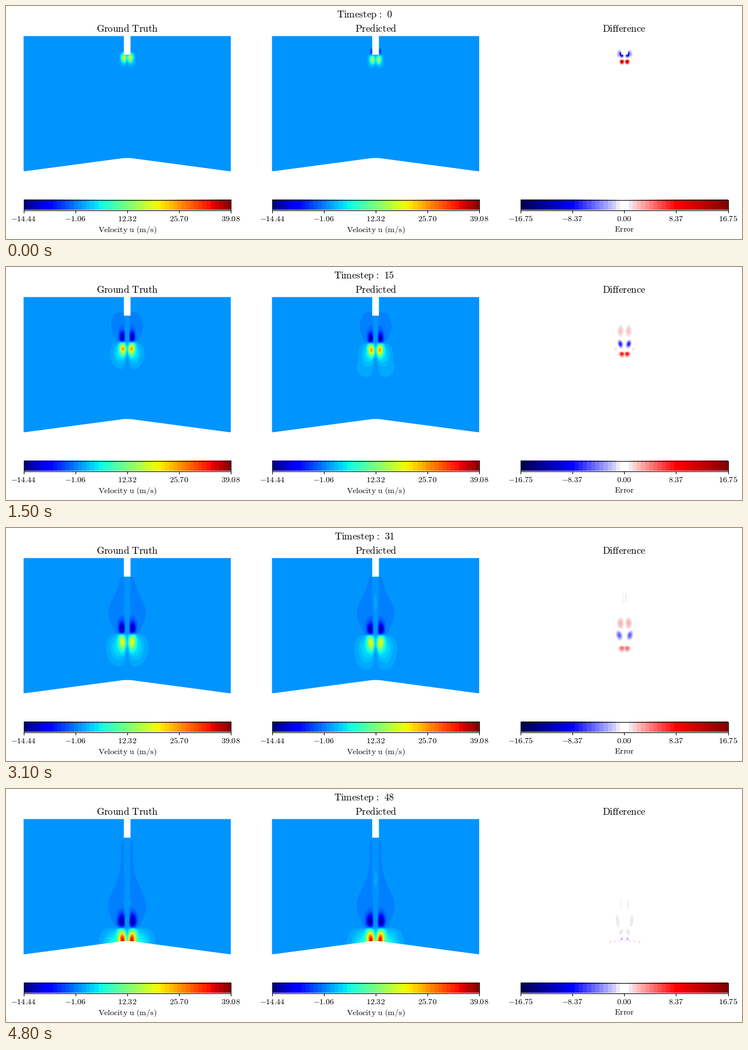
Write a matplotlib script that moves like this. It is 1280 by 407 pixels and loops after 4.9 s.

```python
import numpy as np
import matplotlib.pyplot as plt
from matplotlib.animation import FuncAnimation
from matplotlib.patches import Rectangle

plt.rcParams["mathtext.fontset"] = "cm"

W, H, DPI = 1280, 407, 100
FRAMES, INTERVAL = 49, 100
BANDS = 50
V_RANGE = (-14.44, 39.08)
E_RANGE = (-16.75, 16.75)
LEFT, PITCH, PW = 30.6, 432.3, 360.3
TOP, PH = 52, 238
BAR_TOP, BAR_H = 338.5, 18
LEVEL = 0.535

# Distance from the symmetry axis and height on the stage, per pixel
COLS = 362
d, y = np.meshgrid(np.abs(np.arange(COLS) + 0.5 - 0.6 - PW / 2),
                   TOP + np.arange(PH) + 0.5)
floor = np.clip(265.6 + 22.5 * (d - 6) / 168, 265.6, 288.5)


def within(gap):
    """Pixel coverage for a signed distance to an edge."""
    return np.clip(gap + 0.5, 0, 1)


cover = within(PW / 2 - d) * within(y - 52.5) * within(floor - y)
cover = (cover * (1 - within(5.8 - d) * within(85 - y)))[..., None]


def blob(x0, y0, sx, up, down=None, slant=0.0):
    """Gaussian pair mirrored about the axis, with its own reach up and down."""
    dy = y - y0
    sy = np.where(dy < 0, up, up if down is None else down)
    dx = d - x0 + slant * dy
    return np.exp(-0.5 * ((dx / sx) ** 2 + (dy / sy) ** 2))


def streak(x0, y0, length, width):
    """Slightly bent Gaussian lying along the outgoing wave front."""
    ux, uy = -0.47, 0.883
    a = (d - x0) * ux + (y - y0) * uy
    b = (d - x0) * uy - (y - y0) * ux + 0.006 * a * a
    return np.exp(-0.5 * ((a / length) ** 2 + (b / width) ** 2))


def step(v, width):
    return 1 / (1 + np.exp(-np.clip(v / width, -50, 50)))


def grow(t, tau):
    return 1 - np.exp(-t / tau)


def impact(t):
    """Rises from 0 to 1 as the jet reaches the floor."""
    return step(t - 46, 0.8)


def wave(t):
    return 1.5 * grow(t, 1) * np.exp(-t / 18) * step(12.5 - t, 0.4)


def jet_y(t):
    return 90.5 + 3.48 * t + 7 * impact(t)


def jet_flow(t, yp, front):
    hit = impact(t)
    amp = 17 + 10 * np.exp(-((t - 10) / 7) ** 2) + 15 * hit
    pos = amp * blob(5 + 3.7 * grow(t, 18) - hit, yp,
                     3.4 + 0.03 * t, 5 + 0.14 * t, slant=0.1)

    halo = 2 + 2.5 * grow(t, 4) + 2 * hit
    half = 14 + 14 * grow(t, 3) + 0.0095 * t * t
    drop = 9 + 11 * grow(t, 3) + 0.5 * t
    x0, y0 = 0.38 * half, yp + 8
    r = np.sqrt(2 * np.log(halo / LEVEL))
    pos += halo * blob(x0, y0, (half - x0) / r, 0.6 * (y0 - front), drop / r)
    return pos * (1 - np.exp(-(d / 4) ** 2) * (0.3 + 0.6 * step(y - yp - 9, 3)))


def wake_flow(t, front):
    core = 12 * grow(t, 3) * blob(6.3 + 3.3 * grow(t, 18), front - 6.5 - 0.1 * t,
                                  2.8 + 0.03 * t, 6 + 0.06 * t, 6)
    # Veil that swells above the front and tapers up to the nozzle
    s = front - y
    swell = 38 * grow(t, 11) + 1
    half = 10 + (33 * grow(t, 8) - 10) * np.exp(-((s - swell) / (swell + 2)) ** 2)
    amp = 0.72 + 1.5 * np.exp(-((s - 15) / 25) ** 2)
    veil = amp * np.exp(-(d / np.maximum(half, 4)) ** 2 * np.log(amp / LEVEL))
    veil *= grow(t, 3) * step(y - 73 - 0.3 * t, 1.5)
    return (core + veil) * (1 - np.exp(-(d / 4.8) ** 4))


def flow(t, shift=0.0):
    front = 80 + 3.4 * t + shift
    s = step(y - front, 1.2)
    return s * jet_flow(t, jet_y(t) + shift, front) - (1 - s) * wake_flow(t, front)


def truth(t):
    u = flow(t) + wave(t) * streak(20 + 1.67 * t, 102 + 5 * t,
                                   6 + 1.45 * t, 2 + 0.28 * t)
    return u + 0.9 * step(t - 28, 1) * blob(4, 42 + 3.3 * t, 1.8, 5)


def predicted(t):
    u = flow(t, (1.5 + 1.7 * np.exp(-t / 10)) * (1 - impact(t)))
    u *= 1 - 0.18 * np.exp(-t / 2)

    # Crescent running outward and down
    size, yc = 0.35 + 0.072 * t, 88 + 1.33 * t
    rho = np.hypot((d - 12) / (32 * size), (y - yc) / (63 * size))
    ring = np.exp(-0.5 * ((rho - 0.96) / 0.11) ** 2)
    u += wave(t) * ring * step(y - yc, 2) * step(d - 2 - 0.35 * (y - yc - 45 * size), 1.5)

    # Feet that follow the lobes
    foot = 0.95 * step(t - 11, 1) * np.clip((40 - t) / 20, 0, 1)
    u += foot * blob(21, jet_y(t) + 38, 10, 10, slant=0.35)

    u -= 5 * np.exp(-t) * blob(7, 80, 2, 4)
    return u + 0.85 * step(t - 20, 1) * blob(0, 85 + 1.5 * t, 2.5, 15)


def error(t):
    hit = impact(t)
    thin = 1 - np.exp(-(d / 1.2) ** 2)
    e = -11.5 * np.exp(-t / 42) * (1 - hit) * blob(
        5.5 + 0.12 * t, 85 + 3.3 * t, 2.1 + 0.03 * t, 3 + 0.06 * t, slant=0.15)
    e += 15 * np.exp(-t / 29) * (1 - hit) * blob(
        4.6, 97 + 3.62 * t, 2.1 + 0.04 * t, 2, 2.6 + 0.05 * t)
    e += 2.9 * grow(t, 10) * (1 - 0.6 * hit) * thin * blob(
        7 + 5.5 * hit, 60.5 + 3.42 * t + 8 * hit, 3.6 - hit, 6.5 + 4 * hit, slant=0.1 * hit)

    # Faint traces: nozzle wings, outgoing wave, side lobes, rising threads
    e -= 2.4 * np.exp(-t) * blob(10.5, 83, 2.2, 4.5, slant=-0.2)
    e += 1.15 * wave(t) * streak(17 + 1.25 * t, 100 + 5 * t, 6 + 1.3 * t, 2 + 0.22 * t)
    e += 1.05 * np.exp(-((t - 12) / 5) ** 2) * blob(15, jet_y(t) + 1, 4, 9)
    e += 1.1 * step(t - 20, 0.5) * blob(2.2 + 4.3 * hit, 20 + 3.3 * t + 25 * hit, 0.9, 9)

    # Contact with the floor
    skin = np.exp(-((y - floor + 1) / 1.2) ** 2) * (d < 28)
    e += hit * (2 * skin * (0.6 + 0.4 * np.cos(d * 0.75)) + blob(6, 250, 3.2, 6, slant=-0.3))
    return e - 2.5 * hit * blob(5, 262, 2, 2.5)


def band_colors(name):
    return plt.get_cmap(name)((np.arange(BANDS) + 0.5) / BANDS)[:, :3]


jet = band_colors("jet")
seismic = band_colors("seismic")
seismic[24:26] = 1
seismic[[23, 26]] = np.array([240, 232, 240]) / 255


def paint(values, limits, lut):
    lo, hi = limits
    idx = np.clip((values - lo) / (hi - lo) * BANDS, 0, BANDS - 1).astype(int)
    return 1 - cover * (1 - lut[idx])


fig = plt.figure(figsize=(W / DPI, H / DPI), dpi=DPI, facecolor="white")
ax = fig.add_axes([0, 0, 1, 1])
ax.axis("off")


def roman(s):
    return r"$\mathrm{" + s.replace(" ", r"\ ") + "}$"


def label(x, base, s, size):
    return ax.text(x, base, roman(s), size=size, ha="center", va="baseline")


def picture(data, x, top, width, height):
    return ax.imshow(data, extent=(x, x + width, top + height, top),
                     interpolation="nearest", aspect="auto")


def colorbar(x, lut, limit, name):
    picture(lut[None], x, BAR_TOP, PW, BAR_H)
    ax.add_patch(Rectangle((x, BAR_TOP), PW, BAR_H, fill=False, ec="black", lw=0.8))
    end = BAR_TOP + BAR_H
    for i, v in enumerate(np.linspace(*limit, 5)):
        tx = x + i * PW / 4
        ax.plot([tx, tx], [end, end + 4.9], color="black", lw=0.8)
        # Nudged toward zero so that halves truncate
        label(tx, 376, f"{v - 0.001 * np.sign(v):.2f}", 10.15)
    label(x + PW / 2, 394.4, name, 10.1)


PANELS = [
    ("Ground Truth", truth, V_RANGE, jet, "Velocity u (m/s)"),
    ("Predicted", predicted, V_RANGE, jet, "Velocity u (m/s)"),
    ("Difference", error, E_RANGE, seismic, "Error"),
]

images = []
for i, (title, field, limits, lut, name) in enumerate(PANELS):
    left = LEFT + i * PITCH
    images.append(picture(paint(field(0), limits, lut), int(left), TOP, COLS, PH))
    label(left + PW / 2, 45.4, title, 12.25)
    colorbar(left, lut, limits, name)
clock = label(623, 20.4, "", 12.25)
ax.set_xlim(0, W)
ax.set_ylim(H, 0)


def update(t):
    for im, (_, field, limits, lut, _) in zip(images, PANELS):
        im.set_data(paint(field(t), limits, lut))
    clock.set_text(roman(r"Timestep\hspace{0.08}:\hspace{0.08} " + str(t)))
    return images + [clock]


anim = FuncAnimation(fig, update, frames=FRAMES, interval=INTERVAL,
                     repeat=True, repeat_delay=0, blit=False)
plt.show()
```
